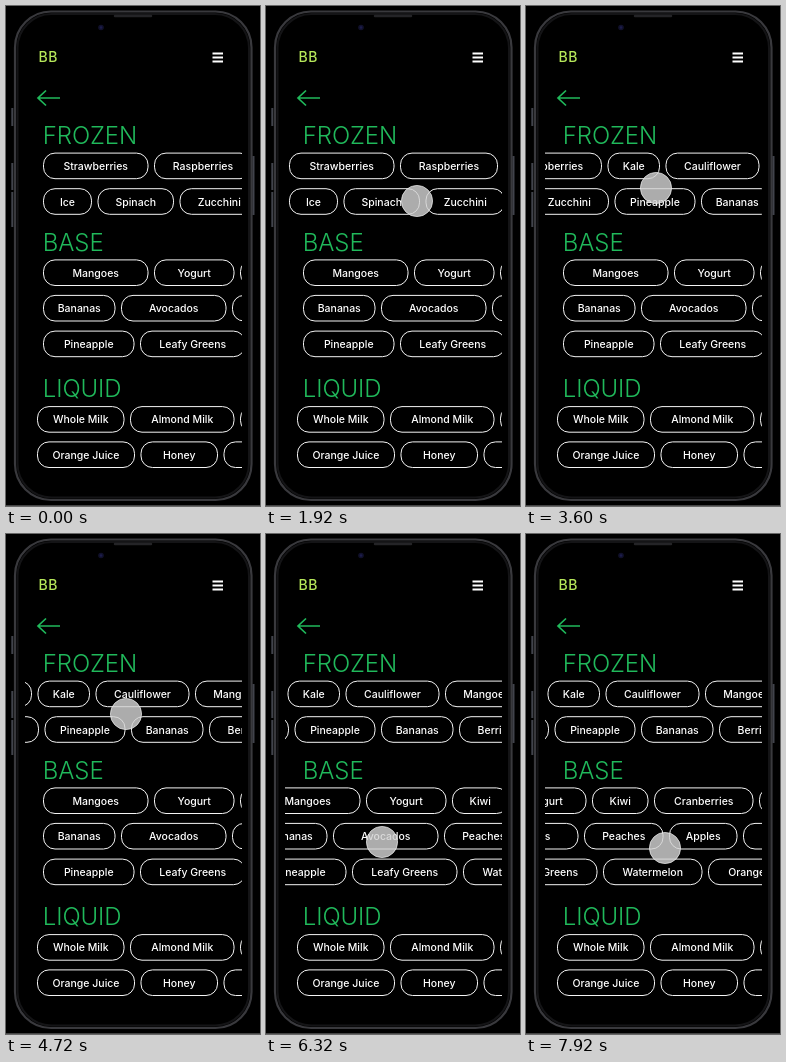
An HTML page that plays this animation: 254 by 500 pixels, repeating every 8000 ms.

```html
<!DOCTYPE html>
<html lang="en">
<head>
<meta charset="utf-8">
<title>Ingredient picker</title>
<style>
  html, body { margin: 0; width: 100%; height: 100%; overflow: hidden; background: #000; }
  svg { display: block; width: 254px; height: 500px; font-family: Inter, "Open Sans", sans-serif; }
  .heading { font-size: 24px; font-weight: 300; letter-spacing: -.1px; fill: #20b95b; }
  .pill rect { fill: none; stroke: #f4f4f4; }
  .pill text { font-size: 10.5px; font-weight: 500; fill: #fff; text-anchor: middle; }
  .brand { font-size: 14px; font-weight: 500; letter-spacing: .5px; fill: #b6e75a; }
</style>
</head>
<body>
<svg viewBox="0 0 254 500">
  <defs>
    <clipPath id="screen"><rect x="19" y="20" width="217" height="460"/></clipPath>
  </defs>
  <rect width="254" height="500"/>

  <!-- phone body -->
  <g fill="none">
    <rect x="9" y="5.5" width="236.5" height="488.5" rx="36" stroke="#39393d" stroke-width="2.2"/>
    <rect x="11.5" y="8" width="231.5" height="483.5" rx="34" stroke="#141416" stroke-width="2"/>
    <path d="M6.3 102v18M6.3 157v27M6.3 186v35M247.5 150v59" stroke="#41434b" stroke-width="2"/>
    <path d="M109 10h36" stroke="#242427" stroke-width="2.5" stroke-linecap="round"/>
  </g>
  <circle cx="95" cy="21.5" r="2.8" fill="#11112c"/>
  <circle cx="95" cy="21.5" r="1.2" fill="#1c1c4c"/>
  <rect y="499" width="254" height="1" fill="#444"/>

  <!-- header -->
  <text class="brand" x="32.5" y="55.8">BB</text>
  <path d="M206.5 47.5h10.5M206.5 51.5h10.5M206.5 55.5h10.5" stroke="#fff" stroke-width="1.8"/>
  <path d="M54 92H32.5M40 84.5L32 92l8 7.5" fill="none" stroke="#20b95b" stroke-width="1.7"/>

  <text class="heading" x="36.8" y="138">FROZEN</text>
  <text class="heading" x="36.8" y="245">BASE</text>
  <text class="heading" x="36.8" y="390.5">LIQUID</text>

  <g id="lists" clip-path="url(#screen)"></g>
  <circle id="touch" r="15.6" fill="#d2d2d2" fill-opacity=".82" stroke="#eee" stroke-opacity=".7"/>
</svg>

<script>
const LOOP = 8000, GAP = 6.5, PILL_HEIGHT = 25.6;
const lists = document.getElementById('lists');
const touch = document.getElementById('touch');

function add(parent, tag, attrs = {}, text = '') {
  const node = document.createElementNS('http://www.w3.org/2000/svg', tag);
  for (const key in attrs) node.setAttribute(key, attrs[key]);
  node.textContent = text;
  return parent.appendChild(node);
}

// Each row is a centre line followed by "label:width" entries.
function addList(left, rows) {
  const list = add(lists, 'g');
  for (const [y, entries] of rows) {
    let x = left;
    for (const entry of entries.split(', ')) {
      const [label, size] = entry.split(':');
      const width = +size;
      const pill = add(list, 'g', { class: 'pill' });
      add(pill, 'rect', { x, y: y - PILL_HEIGHT / 2, width, height: PILL_HEIGHT, rx: 11.5 });
      add(pill, 'text', { x: x + width / 2, y: y + 4 }, label);
      x += width + GAP;
    }
  }
  return list;
}

const frozen = addList(37.5, [
  [159.9, 'Strawberries:104.5, Raspberries:97, Kale:51.5, Cauliflower:93, Mangoes:82'],
  [195.5, 'Ice:48, Spinach:75.5, Zucchini:78.5, Pineapple:80, Bananas:71.5, Berries:72']
]);
const base = addList(37.5, [
  [266.7, 'Mangoes:104.5, Yogurt:79.5, Kiwi:55.5, Cranberries:98.5, Dates:72'],
  [302.2, 'Bananas:71.5, Avocados:104.5, Peaches:78.5, Apples:67.5, Cherries:82'],
  [337.9, 'Pineapple:90.5, Leafy Greens:104.5, Watermelon:98.5, Oranges:82']
]);
addList(31.5, [
  [413.4, 'Whole Milk:86.5, Almond Milk:103.5, Oat Milk:84'],
  [448.7, 'Orange Juice:97, Honey:76.5, Agave:80']
]);

// Finger path: [time, x, y, list being dragged during the segment that starts here]
const path = [
  [720, 270, 232], [1400, 165, 198], [1520, 165, 198, frozen],
  [1920, 151, 195, frozen], [2320, 90, 190], [2720, 175, 188, frozen],
  [3080, 95, 184], [3400, 145, 183, frozen], [3600, 130, 182, frozen],
  [3900, 95, 181], [4400, 135, 181, frozen], [4720, 120, 180, frozen],
  [4960, 110, 180], [5600, 164, 312], [6000, 164, 312, base],
  [6320, 116, 308, base], [6560, 86, 309], [6960, 176, 315, base],
  [7200, 146, 314, base], [7440, 110, 313], [7760, 163, 315, base],
  [7920, 139, 314]
];

const smooth = u => u * u * (3 - 2 * u);

function render(time) {
  const offsets = new Map([[frozen, 0], [base, 0]]);
  let [, x, y] = path[0];
  for (let i = 0; i < path.length - 1 && time >= path[i][0]; i++) {
    const [start, x0, y0, dragged] = path[i];
    const [end, x1, y1] = path[i + 1];
    const u = smooth(Math.min(1, (time - start) / (end - start)));
    x = x0 + (x1 - x0) * u;
    y = y0 + (y1 - y0) * u;
    if (dragged) offsets.set(dragged, offsets.get(dragged) + x - x0);
  }
  for (const [list, dx] of offsets) list.setAttribute('transform', `translate(${dx})`);
  touch.setAttribute('cx', x);
  touch.setAttribute('cy', y);
}

const begin = performance.now();
function tick() {
  render((performance.now() - begin) % LOOP);
  requestAnimationFrame(tick);
}
tick();
</script>
</body>
</html>
```
